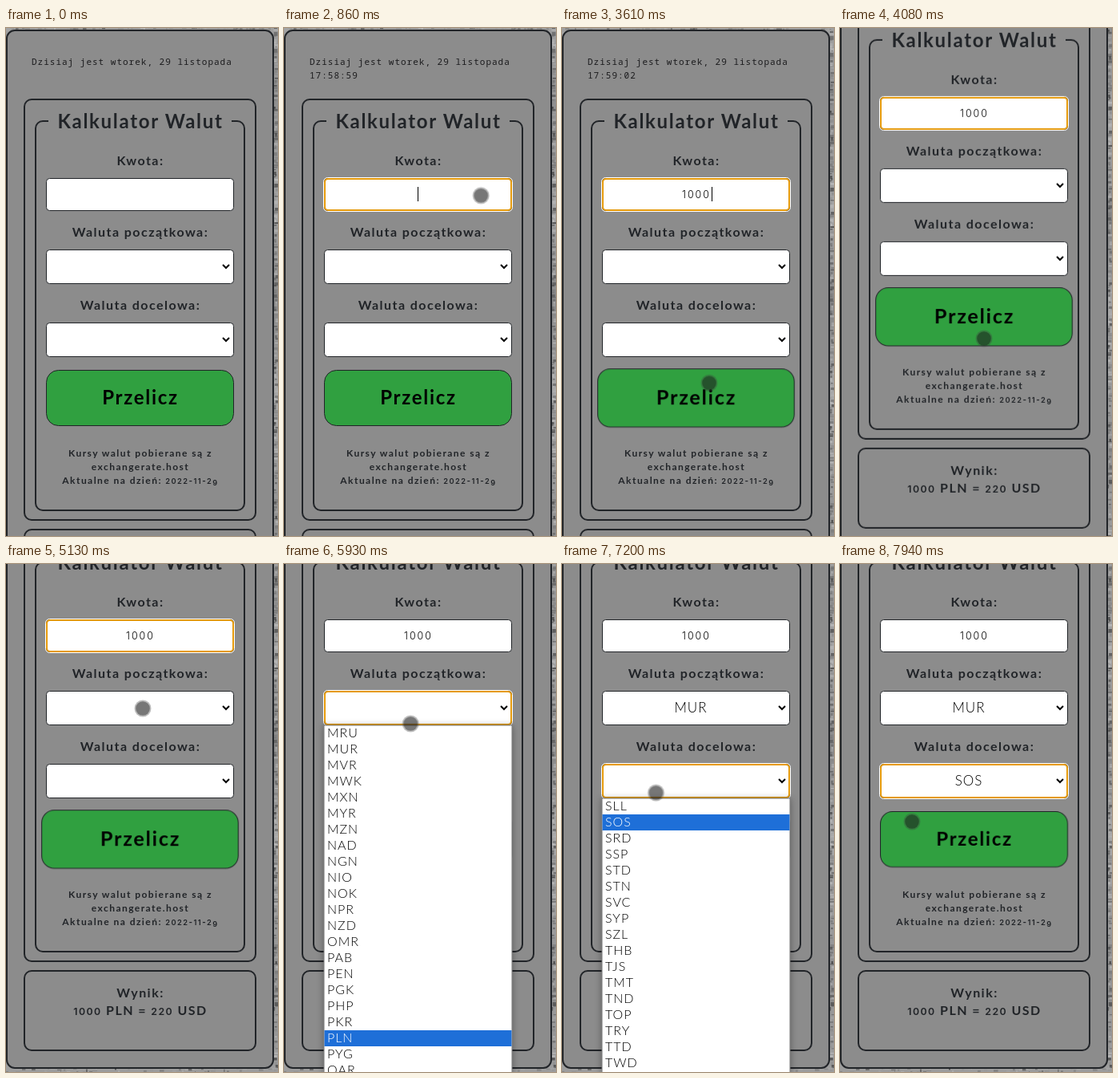
Write an HTML page that moves like this. It is 340 by 633 pixels and loops after 8000 ms.

```html
<!DOCTYPE html>
<html lang="pl">
<head>
<meta charset="utf-8">
<title>Kalkulator Walut</title>
<style>
  html, body { margin: 0; width: 100%; height: 100%; overflow: hidden; background: #8d8d8d; }
  svg { display: block; width: 340px; height: 633px; }
  text { font: 700 16px Lato, sans-serif; letter-spacing: 1.45px; fill: #212428; text-anchor: middle; }
  .clock { font: 500 11px "Noto Sans Mono", monospace; letter-spacing: 1px; text-anchor: start; fill: #1c1c1e; }
  .big { font-size: 24px; letter-spacing: 1.7px; }
  .small { font-size: 12px; }
  .value { font-weight: 300; font-size: 17px; letter-spacing: 1px; fill: #000; }
  .n { font-family: Inter, sans-serif; font-weight: 600; font-size: .77em; }
  .typed { font: 300 12.4px Inter, sans-serif; letter-spacing: 2px; fill: #000; }
  .option { font-weight: 300; font-size: 16px; letter-spacing: 1px; fill: #000; text-anchor: start; }
  .frame { fill: none; stroke: #212428; stroke-width: 2; }
  .field { fill: #fff; stroke: #212428; }
  .arrow { fill: none; stroke: #000; stroke-width: 2; }

  .page, .bg, .button, .caret, .cursor { animation: 8s linear infinite; }
  .page { animation-name: scroll; }
  .bg { animation-name: resize; animation-timing-function: step-end; }
  .button { animation-name: grow; transform-origin: 167.5px 461px; }
  .caret { animation-name: type; animation-timing-function: step-end; }
  .cursor { animation-name: point; }

  @keyframes scroll {
    0%, 45.6% { transform: translateY(0); }
    47.5% { transform: translateY(-39px); }
    49.25% { transform: translateY(-73px); }
    51% { transform: translateY(-101px); }
    52.6%, 100% { transform: translateY(-118px); }
  }
  @keyframes resize {
    0% { transform: none; }
    33.75%, 100% { transform: translateY(5px); }
  }
  @keyframes grow {
    0%, 32.6% { transform: scale(1); animation-timing-function: ease; }
    35.5%, 71% { transform: scale(1.05); animation-timing-function: ease; }
    73.5%, 100% { transform: scale(1); }
  }
  @keyframes type {
    0% { transform: translateX(-20px); }
    12.5% { transform: translateX(-15px); }
    14.125% { transform: translateX(-10px); }
    15.75% { transform: translateX(-5px); }
    17.5%, 100% { transform: none; }
  }
  @keyframes point {
    0%, .8% { transform: translate(323px, 619px); }
    3.75% { transform: translate(290px, 440px); }
    6.9% { transform: translate(256px, 250px); }
    8.75% { transform: translate(247px, 212px); }
    11.25% { transform: translate(246px, 208px); }
    16.9% { transform: translate(245px, 215px); }
    19.4% { transform: translate(230px, 300px); }
    21.75% { transform: translate(207px, 370px); }
    24.4% { transform: translate(212px, 420px); }
    27.5%, 32.5% { transform: translate(206px, 466px); }
    40%, 43.4% { transform: translate(190px, 462px); }
    45.1% { transform: translate(184px, 443px); }
    47.5% { transform: translate(181px, 402px); }
    48.8%, 55.8% { transform: translate(180px, 387px); }
    59.2% { transform: translate(180px, 389px); }
    61.9% { transform: translate(174px, 270px); }
    64.1% { transform: translate(171px, 180px); }
    69.1%, 72.5% { transform: translate(169px, 180px); }
    76.9% { transform: translate(140px, 231px); }
    78.8% { transform: translate(136px, 232px); }
    80.9% { transform: translate(126px, 253px); }
    83.8%, 87.5% { transform: translate(123px, 270px); }
    92.5% { transform: translate(112px, 300px); }
    96.3% { transform: translate(92px, 322px); }
    99.2%, 100% { transform: translate(90px, 321px); }
  }
</style>
</head>
<body>
<svg viewBox="0 0 340 633">
  <defs>
    <linearGradient id="tone" x2="0" y2="1">
      <stop offset="0" stop-color="#a2a2a2"/>
      <stop offset=".15" stop-color="#8a8a8a"/>
      <stop offset=".3" stop-color="#a6a6a6"/>
      <stop offset=".45" stop-color="#858585"/>
      <stop offset=".6" stop-color="#a8a8a8"/>
      <stop offset=".8" stop-color="#939393"/>
      <stop offset="1" stop-color="#a0a0a0"/>
    </linearGradient>
    <filter id="shade" x="-10%" y="-10%" width="120%" height="120%">
      <feDropShadow dx="0" dy="1" stdDeviation="4" flood-opacity=".35"/>
    </filter>
    <g id="focus" fill="none">
      <rect x="-1" y="-1" width="236" rx="5" stroke="#fff" stroke-width="2"/>
    </g>
  </defs>

  <g class="page">
    <g class="bg">
      <rect y="-20" width="340" height="800" fill="url(#tone)"/>
      <g id="flecks"></g>
    </g>
    <rect class="frame" x="1" y="3" width="333" height="743" rx="10" style="fill:#8c8c8c"/>

    <text class="clock" x="32" y="46">Dzisiaj jest wtorek, 29 listopada</text>
    <text class="clock" x="32" y="63" data-on="0,470">17:58:58</text>
    <text class="clock" x="32" y="63" data-on="470,1470">17:58:59</text>
    <text class="clock" x="32" y="63" data-on="1470,2470">17:59:00</text>
    <text class="clock" x="32" y="63" data-on="2470,3470">17:59:01</text>
    <text class="clock" x="32" y="63" data-on="3470,8000">17:59:02</text>

    <rect class="frame" x="23" y="89" width="289" height="524" rx="9"/>
    <path class="frame" d="M53 116H46a9 9 0 0 0-9 9V592a9 9 0 0 0 9 9H289a9 9 0 0 0 9-9V125a9 9 0 0 0-9-9H282"/>
    <text class="big" x="168" y="125">Kalkulator Walut</text>

    <text x="168" y="171">Kwota:</text>
    <rect class="field" x="50.5" y="187.5" width="234" height="40" rx="4"/>
    <text class="typed" x="168" y="212" data-on="1000,1130">1</text>
    <text class="typed" x="168" y="212" data-on="1130,1260">10</text>
    <text class="typed" x="168" y="212" data-on="1260,1400">100</text>
    <text class="typed" x="168" y="212" data-on="1400,8000">1000</text>
    <g data-on="760,2090,2620,3680,4210,4740,5270,5680">
      <rect class="caret" x="187" y="198" width="1" height="18"/>
    </g>

    <text x="168" y="260">Waluta początkowa:</text>
    <rect class="field" x="50.5" y="276.5" width="234" height="42" rx="4"/>
    <path class="arrow" d="M271 295l4 4 4-4"/>
    <text class="value" x="161" y="303" data-on="0,6300">PLN</text>
    <text class="value" x="161" y="303" data-on="6300,8000">MUR</text>

    <text x="168" y="351">Waluta docelowa:</text>
    <rect class="field" x="50.5" y="367.5" width="234" height="42" rx="4"/>
    <path class="arrow" d="M271 386l4 4 4-4"/>
    <text class="value" x="161" y="394" data-on="0,7780">USD</text>
    <text class="value" x="161" y="394" data-on="7780,8000">SOS</text>

    <g id="rings"></g>

    <g class="button">
      <rect x="50.5" y="426.5" width="234" height="69" rx="15" fill="#30a040" stroke="#212428"/>
      <text class="big" x="168" y="469" style="fill:#000">Przelicz</text>
    </g>

    <text class="small" x="168" y="534">Kursy walut pobierane są z</text>
    <text class="small" x="168" y="551">exchangerate.host</text>
    <text class="small" x="168" y="568">Aktualne na dzień: <tspan class="n">2022</tspan>-<tspan class="n">11</tspan>-<tspan class="n">2</tspan><tspan class="n" dy="2">9</tspan></text>

    <rect class="frame" x="23" y="625" width="289" height="99" rx="9"/>
    <text x="168" y="658">Wynik:</text>
    <text x="168" y="680" data-on="2700,8000"><tspan class="n">1000</tspan> PLN = <tspan class="n">220</tspan> USD</text>
  </g>

  <g id="lists"></g>

  <g data-on="70,8000">
    <g class="cursor">
      <circle r="10.5" fill="#404040" fill-opacity=".35"/>
      <circle r="8.8" fill="#101010" fill-opacity=".4"/>
    </g>
  </g>
</svg>
<script>
  const LOOP = 8000;
  const find = id => document.getElementById(id);

  function add(parent, tag, attrs, text) {
    const el = document.createElementNS("http://www.w3.org/2000/svg", tag);
    for (const key in attrs) el.setAttribute(key, attrs[key]);
    if (text) el.textContent = text;
    return parent.appendChild(el);
  }

  // Engraved-paper texture along the visible edges
  let seed = 29;
  const rand = () => (seed = (seed * 16807) % 2147483647) / 2147483647;
  function fleck(x, y, w, h) {
    const shade = Math.floor(40 + rand() * 165);
    add(find("flecks"), "rect", {
      x, y, width: w, height: h, fill: `rgb(${shade},${shade},${shade})`, opacity: .25 + rand() * .45
    });
  }
  for (let y = -10; y < 760; y += 3) fleck(334 + rand() * 3, y, 2 + rand() * 4, 1 + rand() * 4);
  for (let x = 0; x < 340; x += 4) {
    fleck(x, -6 + rand() * 6, 1 + rand() * 6, 2 + rand() * 3);
    fleck(x, 738 + rand() * 10, 1 + rand() * 5, 1 + rand() * 3);
  }

  function ring(y, height, on) {
    const g = add(find("rings"), "g", { "data-on": on, fill: "none" });
    add(g, "rect", { x: 49.5, y: y - .5, width: 236, height: height + 1, rx: 5, stroke: "#fff" });
    add(g, "rect", { x: 51, y: y + 1, width: 233, height: height - 2, rx: 4, stroke: "#e59a0c", "stroke-width": 2 });
  }
  ring(187, 41, "760,5680");
  ring(276, 43, "5680,6850");
  ring(367, 43, "6850,8000");

  function list(top, codes, chosen, on) {
    const g = add(find("lists"), "g", { "data-on": on });
    add(g, "rect", { x: 50, y: top, width: 235, height: 450, fill: "#fff", stroke: "#777", filter: "url(#shade)" });
    codes.split(" ").forEach((code, i) => {
      const y = top + i * 20;
      if (i === chosen) add(g, "rect", { x: 50.5, y, width: 234, height: 20, fill: "#1e6fd8" });
      add(g, "text", { class: "option", x: 54, y: y + 15, style: i === chosen ? "fill:#fff" : "" }, code);
    });
  }
  list(201, "MRU MUR MVR MWK MXN MYR MZN NAD NGN NIO NOK NPR NZD OMR PAB PEN PGK PHP PKR PLN PYG QAR", 19, "5700,6300");
  list(292, "SLL SOS SRD SSP STD STN SVC SYP SZL THB TJS TMT TND TOP TRY TTD TWD TZS", 1, "6900,7780");

  // data-on holds alternating show and hide times in ms
  for (const el of document.querySelectorAll("[data-on]")) {
    const frames = el.dataset.on.split(",").map((t, i) => ({ offset: t / LOOP, opacity: (i + 1) % 2, easing: "step-end" }));
    frames.unshift({ offset: 0, opacity: 0, easing: "step-end" });
    if (frames[frames.length - 1].offset < 1) frames.push({ offset: 1, opacity: 0 });
    el.animate(frames, { duration: LOOP, iterations: Infinity });
  }
</script>
</body>
</html>
```
